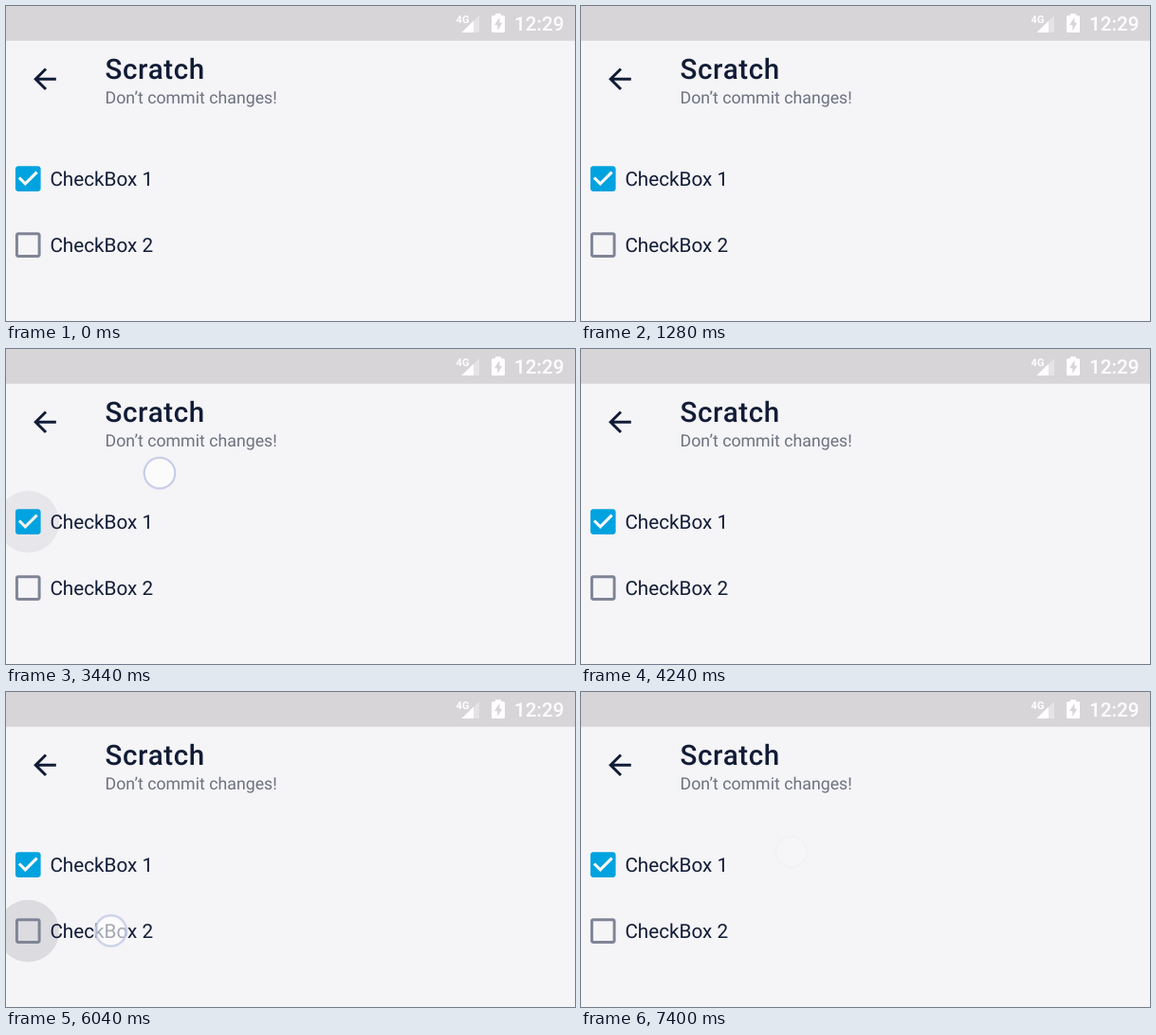
These frames come from a looping animation (600x333 px, 8.04 s). An HTML page:

```html
<!DOCTYPE html>
<html lang="en">
<head>
<meta charset="utf-8">
<title>Checkbox touch</title>
<style>
  html, body { margin: 0; width: 100%; height: 100%; overflow: hidden; background: #f5f4f7; }
  svg { display: block; width: 600px; height: 333px; }
  text { font-family: Roboto, sans-serif; fill: #111c36; text-rendering: geometricPrecision; }
  .title { font-size: 29.6px; font-weight: 500; letter-spacing: .6px; }
  .sub { font-size: 17.76px; fill: #6d7280; }
  .label { font-size: 20.7px; }
  .clock { font-size: 20.7px; font-weight: 500; fill: #fff; }
  .net { font-size: 11px; font-weight: 700; fill: #fff; }
  .ripple circle { fill: #151a28; fill-opacity: .056; transform-box: fill-box; transform-origin: center; }
  .ripple, .touch { opacity: 0; }
  .touch { fill: #fff; fill-opacity: .62; stroke: #c3cae5; stroke-width: 2; }
</style>
</head>
<body>
<svg viewBox="0 0 600 333">
  <rect width="600" height="333" fill="#f5f4f7"/>
  <rect width="600" height="36.7" fill="#d7d5d8"/>

  <!-- status bar -->
  <text class="net" x="474.6" y="17.5">4G</text>
  <path d="M499 10V28H480.5Z" fill="#fff" fill-opacity=".35"/>
  <path d="M493 15.8V28H480.5Z" fill="#fff"/>
  <path d="M516 8h6v2h2.5q1.5 0 1.5 1.5v15q0 1.5-1.5 1.5h-11q-1.5 0-1.5-1.5v-15q0-1.5 1.5-1.5h2.5Z" fill="#fff"/>
  <path d="M520.4 12L515 20.3h3.3v5.7l5-8.3h-2.9Z" fill="#d7d5d8"/>
  <text class="clock" x="536" y="26.3">12:29</text>

  <!-- toolbar -->
  <path transform="translate(23.2 59.5) scale(1.48)" fill="#111c36"
    d="M20 11H7.83l5.59-5.59L12 4l-8 8 8 8 1.41-1.41L7.83 13H20Z"/>
  <text class="title" x="104.5" y="76.8">Scratch</text>
  <text class="sub" x="104.5" y="103.3">Don’t commit changes!</text>

  <g class="ripple"><circle cx="23.3" cy="182.7" r="32.8"/><circle cx="23.3" cy="182.7" r="32.8"/></g>
  <g class="ripple"><circle cx="23.3" cy="252.6" r="32.8"/><circle cx="23.3" cy="252.6" r="32.8"/></g>

  <!-- checkboxes -->
  <path transform="translate(5.5 164.8) scale(1.48)" fill="#00a3df"
    d="M19 3H5C3.89 3 3 3.9 3 5v14c0 1.1.89 2 2 2h14c1.11 0 2-.9 2-2V5c0-1.1-.89-2-2-2ZM10 17l-5-5 1.41-1.41L10 14.17l7.59-7.59L19 8Z"/>
  <path transform="translate(5.5 164.8) scale(1.48)" fill="#fff" fill-opacity=".4"
    d="M10 17l-5-5 1.41-1.41L10 14.17l7.59-7.59L19 8Z"/>
  <path transform="translate(5.5 234.8) scale(1.48)" fill="#7f8596"
    d="M19 5v14H5V5h14m0-2H5c-1.1 0-2 .9-2 2v14c0 1.1.9 2 2 2h14c1.1 0 2-.9 2-2V5c0-1.1-.9-2-2-2Z"/>
  <text class="label" x="46.4" y="190.2">CheckBox 1</text>
  <text class="label" x="46.4" y="260.2">CheckBox 2</text>

  <circle class="touch" r="16.3"/>
  <circle class="touch" r="16.3"/>
</svg>
<script>
const LOOP = 8040;

// Times in ms; positions are touch centres.
const gestures = [
  { press: 1480, drag: 3200, from: [118.5, 184], to: [172.5, 118.3], rest: 0 },
  { press: 4400, drag: 6040, from: [110.5, 252.5], to: [222, 169], rest: .04 }
];

// Steps are [time, value, easing to the next step].
function loop(el, prop, steps) {
  const first = steps[0], last = steps[steps.length - 1];
  const frames = [[0, first[1]], ...steps, [LOOP, last[1]]].map(([t, value, easing = 'linear']) =>
    ({ offset: t / LOOP, [prop]: value, easing }));
  el.animate(frames, { duration: LOOP, iterations: Infinity });
}

const ripples = document.querySelectorAll('.ripple');
const touches = document.querySelectorAll('.touch');
const move = ([x, y]) => `translate(${x}px, ${y}px)`;

gestures.forEach(({ press, drag, from, to, rest }, i) => {
  const stop = drag + 480;
  loop(touches[i], 'transform', [[drag, move(from), 'ease'], [stop, move(to)]]);
  loop(touches[i], 'opacity', [[press, 0], [press + 100, 1], [stop + 20, 1], [stop + 160, rest]]);
  loop(ripples[i], 'opacity', [[press, 0], [press + 160, 1], [drag, 1], [drag + 500, 0]]);
  loop(ripples[i].lastElementChild, 'transform',
    [[press, 'scale(.1)', 'ease-out'], [press + 480, 'scale(1)']]);
});
</script>
</body>
</html>
```
